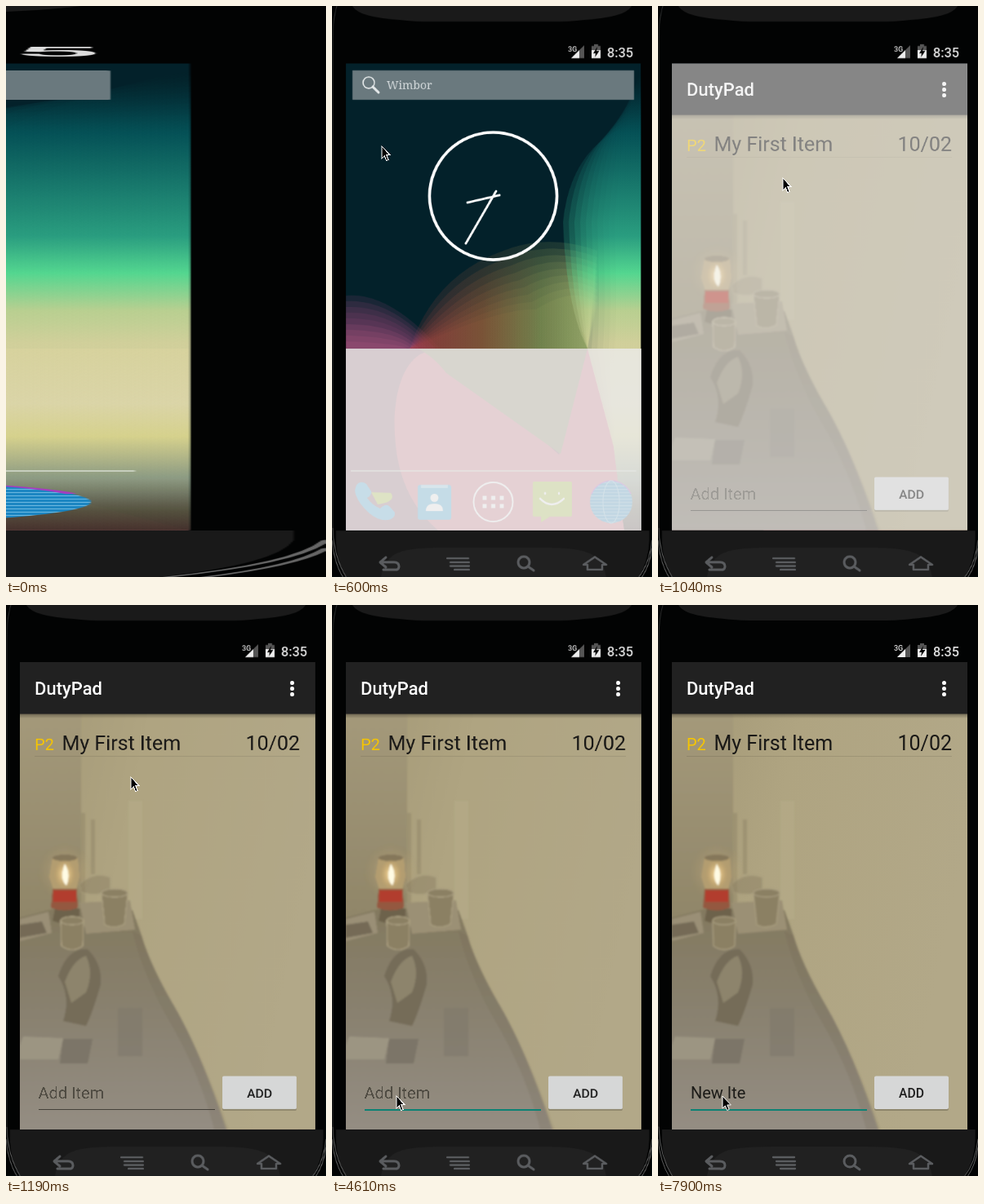
Recreate the animation shown at these times as an HTML page. Size 392 by 700 pixels, loop 8000 ms.

```html
<!DOCTYPE html>
<html lang="en">
<head>
<meta charset="utf-8">
<title>To-do demo</title>
<style>
html, body { margin: 0; width: 100%; height: 100%; overflow: hidden; background: #000; }
#stage { position: absolute; left: 0; top: 0; width: 392px; height: 700px; transform-origin: 392px 0; }
svg { position: absolute; left: 0; top: 0; overflow: hidden; }
text, #typed { font-family: Roboto, sans-serif; }
.medium { font-weight: 500; }
.big { font-size: 25px; fill: #1a1917; }
.line { fill: none; stroke-linecap: round; stroke-linejoin: round; }

#stage, #veil, #blank, #app, #hint, #idle, #focus, #typed, #cursor {
  animation: 8s step-end infinite;
}
#stage { animation-name: stretch; }
#veil { animation-name: veil; }
#blank { animation-name: blank; }
#app { animation-name: app; }
#hint { animation-name: hint; }
#focus { animation-name: focus; }
#idle { animation-name: idle; }
#typed {
  position: absolute; left: 40px; top: 583px; height: 28px; width: 0;
  overflow: hidden; white-space: pre; font-size: 20px; line-height: 30px; color: #1c1b18;
  border-right: 2px solid transparent; animation-name: type, blink;
}
#cursor { width: 13px; height: 21px; animation-name: point; }

@keyframes stretch { 0% { transform: scaleX(12) } 1.875%, 100% { transform: none } }
@keyframes veil { 0% { opacity: 0 } 7.5% { opacity: .8 } 9.25%, 100% { opacity: 0 } }
@keyframes blank { 0% { opacity: 0 } 9.25% { opacity: 1 } 14.875%, 100% { opacity: 0 } }
@keyframes app { 0% { opacity: 0 } 13% { opacity: .5 } 14.875%, 100% { opacity: 1 } }
@keyframes hint { 0% { opacity: 1 } 68.875%, 100% { opacity: 0 } }
@keyframes focus { 0% { opacity: 0 } 50.25%, 100% { opacity: 1 } }
@keyframes idle { 0% { opacity: 1 } 50.25%, 100% { opacity: 0 } }
@keyframes type {
  0% { width: 0 }
  68.875% { width: 14.3px }
  74.5% { width: 24.9px }
  78.25% { width: 39.9px }
  80.125% { width: 44.8px }
  87.625% { width: 50.3px }
  91.375% { width: 56.8px }
  93.125%, 100% { width: 67.4px }
}
@keyframes blink {
  0%, 57.625%, 85.75%, 98.75%, 100% { border-color: transparent }
  52.125%, 65.125%, 87.625% { border-color: #00897b }
}
@keyframes point {
  0% { transform: translate(60px, 171px) }
  9.25% { transform: translate(112px, 194px) }
  11.125% { transform: translate(152px, 210px) }
  18.625% { transform: translate(190px, 306px) }
  20.375% { transform: translate(221px, 384px) }
  24.125% { transform: translate(204px, 440px) }
  26% { transform: translate(170px, 520px) }
  27.875% { transform: translate(140px, 580px) }
  29.75% { transform: translate(126px, 595px) }
  44.625% { transform: translate(112px, 597px) }
  46.5% { transform: translate(92px, 600px) }
  48.375%, 100% { transform: translate(78px, 601px) }
}
</style>
</head>
<body>
<div id="stage">
<svg width="392" height="700" viewBox="0 0 392 700">
  <defs>
    <clipPath id="screen"><rect x="17" y="70.5" width="361.1" height="572"/></clipPath>
    <linearGradient id="aurora" gradientUnits="userSpaceOnUse" x1="0" y1="70" x2="0" y2="642">
      <stop offset="0" stop-color="#021a20"/>
      <stop offset=".08" stop-color="#04363e"/>
      <stop offset=".15" stop-color="#065358"/>
      <stop offset=".28" stop-color="#1c8272"/>
      <stop offset=".37" stop-color="#2ba283"/>
      <stop offset=".45" stop-color="#57de94"/>
      <stop offset=".53" stop-color="#c0d795"/>
      <stop offset=".6" stop-color="#dad79f"/>
      <stop offset=".73" stop-color="#dedaaa"/>
      <stop offset=".8" stop-color="#d9d68e"/>
      <stop offset=".89" stop-color="#8c9d84"/>
      <stop offset=".96" stop-color="#514f3c"/>
      <stop offset="1" stop-color="#41302a"/>
    </linearGradient>
    <linearGradient id="fan" gradientUnits="userSpaceOnUse" x1="100" y1="0" x2="340" y2="0">
      <stop offset="0" stop-color="#a63c40"/>
      <stop offset=".35" stop-color="#98603a"/>
      <stop offset=".65" stop-color="#8d9a55"/>
      <stop offset="1" stop-color="#c8d884"/>
    </linearGradient>
    <linearGradient id="wall" x1="0" x2="1" y2=".3">
      <stop offset="0" stop-color="#a39876"/>
      <stop offset=".4" stop-color="#afa481"/>
      <stop offset="1" stop-color="#b2a888"/>
    </linearGradient>
    <linearGradient id="corner" x2="0" y2="1">
      <stop offset="0" stop-color="#a59a7b"/>
      <stop offset="1" stop-color="#908669"/>
    </linearGradient>
    <linearGradient id="desk" x2="0" y2="1">
      <stop offset="0" stop-color="#83795f"/>
      <stop offset=".45" stop-color="#89816f"/>
      <stop offset="1" stop-color="#958e84"/>
    </linearGradient>
    <linearGradient id="shade" x2="0" y2="1">
      <stop offset="0" stop-opacity=".35"/>
      <stop offset="1" stop-opacity="0"/>
    </linearGradient>
    <radialGradient id="glow">
      <stop offset="0" stop-color="#fff6c8"/>
      <stop offset=".3" stop-color="#f0cf90" stop-opacity=".8"/>
      <stop offset="1" stop-color="#c7a468" stop-opacity="0"/>
    </radialGradient>
    <filter id="soft"><feGaussianBlur stdDeviation="1"/></filter>
    <pattern id="stripes" width="8" height="4" patternUnits="userSpaceOnUse">
      <rect width="8" height="4" fill="#1c86c2"/>
      <rect width="8" height="1" fill="#6cb8e0"/>
    </pattern>
  </defs>

  <!-- phone body -->
  <rect width="392" height="700" fill="#020303"/>
  <path d="M25 0H367C360 12 335 15 300 18Q290 19 280 19H112Q102 19 92 18C57 15 32 12 25 0Z" fill="#1a1a1a"/>
  <path d="M5 643H388.700V655Q387 684 375 700H18Q6 684 5 655Z" fill="#191919"/>
  <path d="M60 700Q64 672 92 667Q110 664 140 664H255Q285 664 302 667Q332 672 336 700Z" fill="#212121"/>
  <g class="line">
    <path d="M6 0Q1 15 1 45V640" stroke="#303232" stroke-width=".8"/>
    <path d="M1 640Q2 676 18 701M0 655Q3 684 14 701M392 655Q389 684 375 701M392 665Q389 687 379 701" stroke="#666" stroke-width=".9"/>
  </g>
  <g class="line" stroke="#5a5c5f" stroke-width="3">
    <path d="M60 682H76Q82 682 82 687T76 691H63M66 676L59 682L66 688"/>
    <path d="M141 677H167M145 682H168M145 686.500H168M150 691H168" stroke-width="2.300"/>
    <circle cx="235" cy="682" r="7"/><path d="M240 687L247 692"/>
    <path d="M308 685L322 675.500L336 685H331V691H313V685Z" stroke-width="2.500"/>
  </g>

  <!-- status bar -->
  <text x="289" y="56" font-size="9" class="medium" fill="#ddd">3G</text>
  <path d="M309 48V64H293Z" fill="#555"/>
  <path d="M303 54V64H293Z" fill="#eee"/>
  <path d="M321 47H326V49H329V64H318V49H321Z" fill="#555"/>
  <path d="M318 54H329V64H318Z" fill="#eee"/>
  <path d="M325 50L320 58H323L322 63L327.500 55H324Z" fill="#000"/>
  <text x="337" y="62.500" font-size="16.300" class="medium" fill="#dcdcdc">8:35</text>

  <!-- home screen -->
  <g clip-path="url(#screen)">
    <rect x="17" y="70" width="362" height="573" fill="#03212a"/>
    <g id="wallpaper">
      <path d="M17 420H378V643H17Z" fill="#8d5968"/>
      <path d="M77 525C73 450 105 405 145 430L278 550L313 420L355 570L378 643H130Q80 600 77 525Z" fill="#cd6978"/>
      <path d="M105 420H313L280 549L140 450Q125 430 105 420Z" fill="#8c825f"/>
    </g>
    <rect x="25" y="79" width="345" height="36" rx=".5" fill="#6a797e"/>
    <g class="line" stroke="#e4e8e9">
      <circle cx="45" cy="94" r="7" stroke-width="1.500"/>
      <path d="M50 99L57 106" stroke-width="3"/>
    </g>
    <text x="67" y="102" font-size="14" style="font-family:'Noto Serif',serif" fill="#d3d9db">Wimbor</text>
    <g class="line" stroke="#fff">
      <circle cx="197.500" cy="233" r="78" stroke-width="3.600"/>
      <path d="M205 232L166 241M201 227L164 291" stroke-width="2.800"/>
    </g>
    <path d="M23 570H372.500" stroke="#d6dcd0" stroke-width="1.300"/>
    <path d="M48 596L72 597Q78 604 66 609L56 611Z" fill="#a9c22d"/>
    <path d="M30 587Q36 581 42 586L48 595Q49 600 43 603Q49 612 59 616Q65 610 70 613L77 621Q78 627 70 630Q58 632 46 622Q30 608 28 594Z" fill="#36a6dd"/>
    <rect x="105" y="587" width="41" height="43" rx="3" fill="#2f9fd6"/>
    <path d="M109 587H142V591H109Z" fill="#8fd2f0"/>
    <g fill="#fff">
      <circle cx="125.500" cy="603" r="5"/>
      <path d="M115 619Q115 610 125.500 610T136 619Z"/>
    </g>
    <circle cx="197.500" cy="608" r="24" fill="none" stroke="#fff" stroke-width="2"/>
    <path d="M184.500 603H210.500M184.500 613H210.500" stroke="#fff" stroke-width="5" stroke-dasharray="5 5.500"/>
    <path d="M248 583H292Q294 583 294 585V624Q294 626 292 626H267L256 633V626H248Q246 626 246 624V585Q246 583 248 583Z" fill="#a4bd2c"/>
    <g class="line" stroke="#fff" stroke-width="2.500">
      <path d="M255 604Q269 618 284 604M261 597V598M278 597V598"/>
    </g>
    <circle cx="342" cy="608" r="26" fill="url(#stripes)"/>
    <path d="M318 598A26 26 0 0 1 366 598" fill="none" stroke="#a53cc0" stroke-width="1.200"/>
    <ellipse cx="342" cy="608" rx="10" ry="26" fill="none" stroke="#7cc0e2"/>
    <rect id="veil" x="17" y="420" width="362" height="223" fill="#ececec"/>
    <rect id="blank" x="17" y="70" width="362" height="573" fill="#ececec"/>
  </g>

  <!-- to-do screen -->
  <g id="app" clip-path="url(#screen)">
    <rect x="17" y="133" width="362" height="510" fill="url(#wall)"/>
    <g filter="url(#soft)">
      <path d="M10 125H92V385H10Z" fill="url(#corner)"/>
      <path d="M92 255H97V375H92ZM104 263H109V330H104Z" fill="#8f8465" opacity=".45"/>
      <path d="M150 240H167V385H150Z" fill="#b9ae8c" opacity=".4"/>
      <path d="M10 385L60 372L155 374L166 405Q176 440 205 490Q240 550 272 650H10Z" fill="url(#desk)"/>
      <path d="M155 400L166 405Q176 440 205 490Q240 550 272 643H255Q238 575 200 510Q168 455 155 400Z" fill="#71674f" opacity=".2"/>
      <path d="M90 365L152 362L158 398L98 403Z" fill="#9b9075"/>
      <path d="M17 385L52 376L56 402L17 412Z" fill="#9a8f76"/>
      <path d="M17 392L44 388L50 402L17 408Z" fill="#746b56"/>
      <path d="M21 529L70 531L64 557H17V540Z" fill="#9c9582"/>
      <path d="M70 532H106L100 562H66Z" fill="#7b7468"/>
      <path d="M137 494H167V553H137Z" fill="#7f786b" opacity=".6"/>
      <path d="M64 455Q75 420 100 422Q118 440 116 465Q106 500 98 516L70 510Q80 480 64 455Z" fill="#756c59"/>
      <path d="M72 462Q82 435 98 430Q108 450 98 475L80 488Z" fill="#8d846c"/>
      <path d="M60 372H90V388Q75 394 57 387Z" fill="#6d624b"/>
      <ellipse cx="72" cy="328" rx="34" ry="36" fill="url(#glow)" opacity=".3"/>
      <path d="M57 310Q72 303 88 310L90 333L86 349H58L53 333Z" fill="#b39d70"/>
      <ellipse cx="72" cy="310" rx="15" ry="4" fill="#85775a"/>
      <path d="M57 348H87L88 371Q72 378 55 371Z" fill="#94583f"/>
      <path d="M58 350H86V364H58Z" fill="#b23c2d"/>
      <ellipse cx="72" cy="330" rx="14" ry="19" fill="url(#glow)"/>
      <path d="M72 317Q80 330 74 344Q65 336 72 317Z" fill="#fffbe4"/>
      <g fill="#8b8064" stroke="#a89d7f" stroke-width="1.300">
        <path d="M90 342Q108 326 128 334V350Q110 358 92 352Z" opacity=".5"/>
        <path d="M117 354L121 392Q133 398 145 391L149 354Z"/>
        <ellipse cx="133" cy="353" rx="16" ry="5"/>
        <path d="M67 388L68 418Q81 427 94 418L95 388Z"/>
        <ellipse cx="81" cy="387" rx="14" ry="5"/>
      </g>
    </g>

    <rect x="17" y="133" width="362" height="6" fill="url(#shade)"/>
    <rect x="17" y="70" width="362" height="63.500" fill="#212121"/>
    <text x="35" y="110" font-size="22" class="medium" fill="#fff">DutyPad</text>
    <g fill="#fff">
      <circle cx="350.500" cy="95.500" r="2.500"/><circle cx="350.500" cy="102.500" r="2.500"/><circle cx="350.500" cy="109.500" r="2.500"/>
    </g>
    <text x="35" y="178" font-size="20" fill="#f6c500">P2</text>
    <text x="68.500" y="178" class="big">My First Item</text>
    <text x="360" y="178" class="big" text-anchor="end">10/02</text>
    <path d="M35 185.500H360" stroke="#000" stroke-opacity=".1"/>
    <text id="hint" x="39.500" y="605" font-size="20" fill="#504c43">Add Item</text>
    <path id="idle" d="M40 618.500H256" stroke="#45413a" stroke-width="1.300"/>
    <path id="focus" d="M40 619H256" stroke="#0d8274" stroke-width="2"/>
    <rect x="265" y="579" width="91" height="41" rx="2.500" fill="#000" opacity=".2"/>
    <rect x="265" y="577.500" width="91" height="40.500" rx="2" fill="#d6d7d7"/>
    <text x="310.500" y="604" font-size="15.700" class="medium" text-anchor="middle" fill="#1f1f1f">ADD</text>
  </g>
</svg>
<div id="typed">New Ite</div>
<svg id="cursor" viewBox="0 0 13 21">
  <path d="M1 1V16L4.300 12.900L6.700 18.500L9.200 17.400L6.800 11.900H11.300Z" fill="#000" stroke="#fff" stroke-width="1"/>
</svg>
</div>
<script>
const wallpaper = document.getElementById('wallpaper');

function layer(tag, attributes) {
  const shape = document.createElementNS('http://www.w3.org/2000/svg', tag);
  for (const [name, value] of Object.entries(attributes)) shape.setAttribute(name, value);
  wallpaper.append(shape);
}

// Overlapping translucent petals give the wallpaper its soft bands.
for (let i = 0; i < 9; i++) {
  layer('path', {
    d: `M95 420Q${125 + i * 10} ${330 + i * 5} ${210 + i * 5} ${300 + i * 9}` +
       `Q${265 + i * 4} ${278 + i * 8} 325 ${300 + i * 8}L313 420Z`,
    fill: 'url(#fan)', opacity: .16
  });
  layer('path', {
    d: `M17 ${355 + i * 7}Q${70 + i * 2} ${350 + i * 8} ${132 - i * 5} 420H17Z`,
    fill: i < 5 ? '#8f4474' : '#b65a80', opacity: .17
  });
}
for (let i = 0; i < 10; i++) {
  const edge = 283 + i * 7;
  layer('path', {
    d: `M379 ${140 - i * 7}Q${edge + 10} ${165 - i * 4} ${edge} 265` +
       `Q${edge + 4} 370 ${Math.max(edge, 313)} 420L${Math.max(edge, 345)} 540L358 643H379Z`,
    fill: 'url(#aurora)', opacity: .27
  });
}
</script>
</body>
</html>
```
